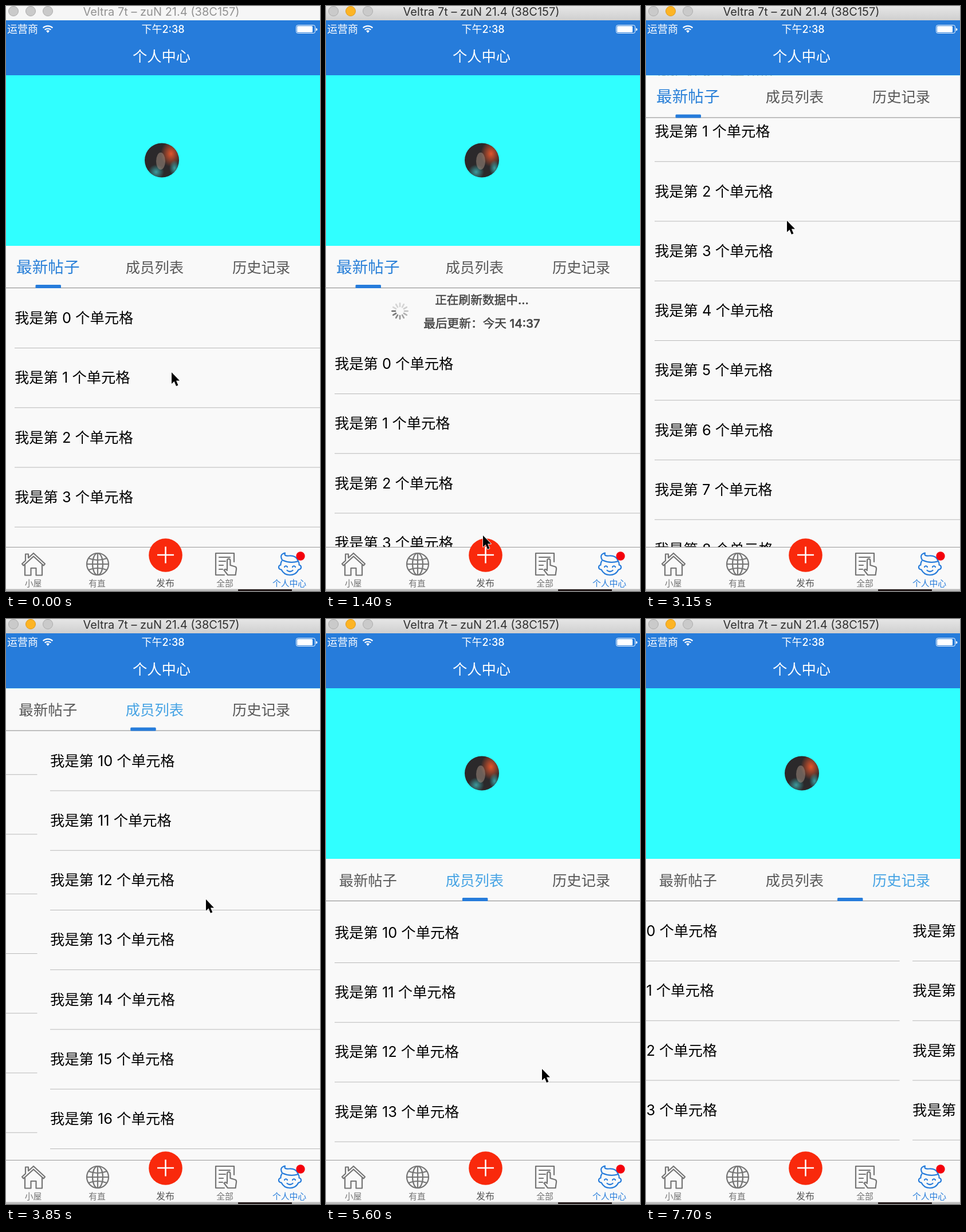
Write an HTML page that moves like this. It is 548 px wide and 1022 px high and loops after 8 s.

```html
<!DOCTYPE html>
<html lang="zh-CN">
<head>
<meta charset="utf-8">
<title>个人中心</title>
<style>
  html, body { margin: 0; width: 100%; height: 100%; overflow: hidden; background: #f9f9f9; }
  svg { display: block; width: 100vw; height: 100vh; }
  text { font-family: Inter, "Noto Sans CJK SC", "Noto Sans CJK", sans-serif; white-space: pre; }
  .mid, .hint, .label { text-anchor: middle; }
  .row { font-size: 25.3px; font-kerning: none; }
  .hint { font-size: 20.7px; font-weight: 500; fill: #444; stroke: #444; stroke-width: .5px; }
  .label { font-size: 14.8px; fill: #757575; }
  .icon { fill: none; stroke: #757575; stroke-width: 2.2; stroke-linejoin: round; stroke-linecap: round; }
  .on { stroke: #267cdb; }
</style>
</head>
<body>
<svg viewBox="0 0 548 1022" preserveAspectRatio="none">
  <defs>
    <linearGradient id="bar" x2="0" y2="1">
      <stop stop-color="#e6e6e6"/><stop offset="1" stop-color="#cfcfcf"/>
    </linearGradient>
    <radialGradient id="warm"><stop stop-color="#e0562c"/><stop offset="1" stop-color="#e0562c" stop-opacity="0"/></radialGradient>
    <radialGradient id="cool"><stop stop-color="#3c9a9c"/><stop offset="1" stop-color="#3c9a9c" stop-opacity="0"/></radialGradient>
    <clipPath id="round"><circle cx="272" cy="269.5" r="30"/></clipPath>
  </defs>
  <rect width="548" height="1022" fill="#f9f9f9"/>
  <g id="pages"></g>

  <g id="head">
    <rect y="115" width="548" height="304" fill="#30ffff"/>
    <g clip-path="url(#round)">
      <rect x="242" y="239" width="60" height="61" fill="#2b292b"/>
      <ellipse cx="288" cy="258" rx="18" ry="23" fill="url(#warm)"/>
      <ellipse cx="262" cy="290" rx="14" ry="13" fill="url(#cool)"/>
      <ellipse cx="294" cy="283" rx="9" ry="14" fill="url(#cool)"/>
      <ellipse cx="270" cy="271" rx="8" ry="15" fill="#a08d80" opacity=".55"/>
    </g>
    <rect y="419" width="548" height="74" fill="#f9f9f9"/>
    <path d="M0 492.5H548" stroke="#858585"/>
    <g id="tabs"></g>
    <rect id="mark" y="487" width="44.5" height="6" rx="1.5" fill="#267cdb"/>
  </g>

  <rect y="25" width="548" height="96" fill="#267cdb"/>
  <g fill="#fff">
    <text x="2" y="47" font-size="18">运营商</text>
    <text class="mid" x="274" y="47" font-size="18" font-weight="500">下午2:38</text>
    <text class="mid" x="271.5" y="97" font-size="25.3" font-weight="500">个人中心</text>
    <path d="M73 47l-3-3.400a4.400 4.400 0 0 1 6 0z"/>
    <g fill="none" stroke="#fff" stroke-width="2.1">
      <path d="M67.6 41.6a8 8 0 0 1 10.8 0M64.6 38.2a12.4 12.4 0 0 1 16.8 0"/>
      <rect x="506.5" y="33.5" width="33" height="14" rx="3" stroke-width="1"/>
    </g>
    <rect x="508" y="35" width="27" height="11" rx="1.5"/>
    <path d="M541 38.5a2.4 2.4 0 0 1 0 5z"/>
  </g>

  <rect id="chrome" width="548" height="25"/>
  <g id="lights"></g>
  <text id="caption" class="mid" x="271" y="16.5" font-size="20">Veltra 7t – zuN 21.4 (38C157)</text>

  <rect y="945" width="548" height="77" fill="#f9f9f9"/>
  <path d="M0 945.5H548" stroke="#999"/>
  <rect y="1018.5" width="548" height="4" fill="#bdbdbd"/>
  <rect x="405" y="1019" width="94" height="3" fill="#251c1c"/>

  <g class="icon">
    <path d="M48 956L68 974.5L65.5 977.5L48 961.5L30.5 977.5L28 974.5L34 969V957.5H39V964.2Z"/>
    <path d="M33 976V994.5H43.5V982H52.5V994.5H63V976"/>
    <circle cx="160" cy="975" r="19"/>
    <ellipse cx="160" cy="975" rx="9" ry="19"/>
    <path d="M160 956V994M141 975H179M144.5 965Q160 971 175.500 965M144.500 985Q160 979 175.500 985"/>
    <path d="M381 994H366V956H398V971M372 963H391M372 970H383M372 977H379M372 984H378"/>
    <path d="M386 984V968.5a2.7 2.7 0 0 1 5.4 0V977L400 979.5Q402.5 980.5 402 984L400.5 994H387L380.5 985.5Q383 982.5 386 986"/>
  </g>
  <g class="icon on">
    <path d="M482 968Q476.5 958 487 955.5Q484.5 961.5 494 960.5Q507 959.5 510 970Q496 974.5 482 968Z"/>
    <path d="M481 970Q479 974 479.500 976.500A3.800 3.800 0 0 0 480.500 984.500Q485 994 495.500 994T510.500 984.500A3.800 3.800 0 0 0 511.500 976.500Q512 973 510 970"/>
    <path d="M486 980q2.5-3.5 5 0M500 980q2.5-3.5 5 0M490.5 986Q495.5 990 500.5 986"/>
  </g>
  <circle cx="514" cy="961" r="7.7" fill="#f4000c"/>
  <circle cx="278.5" cy="959.5" r="29.3" fill="#f9290c"/>
  <path d="M264 959H293M278.5 944.5V973.5" stroke="#fff" stroke-width="2.6"/>
  <g class="label">
    <text x="47.5" y="1014">小屋</text>
    <text x="159" y="1014">有直</text>
    <text x="278" y="1013.5" font-size="16" fill="#555">发布</text>
    <text x="382" y="1014">全部</text>
    <text x="494.5" y="1014" fill="#267cdb">个人中心</text>
  </g>

  <path id="cursor" d="M0 0V20L4.6 15.8L8 24L11.4 22.5L8 14.6H14Z" stroke="#fff" stroke-width="1.6" stroke-linejoin="round" paint-order="stroke"/>
</svg>
<script>
const LOOP = 8000, STEP = 350;
const PAGE_W = 558, EDGE = -7.5, ROW_H = 104.25, TAB_GAP = 186.4;
const FOLD = 297.5, HOLD = 80;
const $ = id => document.getElementById(id);

function set(el, attrs) {
  for (const k in attrs) el.setAttribute(k, attrs[k]);
  return el;
}
function add(parent, tag, attrs, text = '') {
  const el = set(document.createElementNS('http://www.w3.org/2000/svg', tag), attrs);
  el.textContent = text;
  return parent.appendChild(el);
}
const move = (el, x, y) => set(el, { transform: `translate(${x} ${y})` });

// Progress of step s from a to b
const ramp = (s, a, b) => Math.min(1, Math.max(0, (s - a) / (b - a)));
const smooth = (s, a, b) => { const x = ramp(s, a, b); return x * x * (3 - 2 * x); };
const easeOut = (s, a, b) => 1 - (1 - ramp(s, a, b)) ** 2;

// Pull past the refresh height, hold there from `busy`, spring back around `done`
function pull(s, { busy, done }) {
  const g = ramp(s, busy - 2, busy);
  return (HOLD * g + 70 * Math.sin(Math.PI * g)) * (1 - ramp(s, done - .26, done + .74));
}

const fold = s => FOLD * (smooth(s, 7, 9) - smooth(s, 14, 16));
const swipe = s => easeOut(s, 9, 12);
const page = s => swipe(s) + smooth(s, 21, 24.55);
const tab = s => swipe(s) + ramp(s, 21, 22.94);

const lists = [
  { busy: 4, done: 7, last: '14:37', scroll: s => -430 * smooth(s, 7, 9) },
  { busy: 17.98, done: 21, last: '14:38', scroll: s => FOLD * (smooth(s, 13.43, 16) - 1) },
  { busy: 99, done: 99, last: '14:38', scroll: () => 0 }
];

// Resting points of the pointer: step, x, y
const stops = [
  [2, 289, 640], [4, 274, 925], [7, 249, 786], [9, 246, 375], [12, 385, 530],
  [14, 282, 566], [16, 377, 786], [18, 374, 920], [21, 440, 465]
];
function pointer(s) {
  const i = Math.max(1, stops.findIndex(p => p[0] >= s));
  const [a, ax, ay] = stops[i - 1], [b, bx, by] = stops[i];
  const k = smooth(s, a, b);
  return [ax + (bx - ax) * k, ay + (by - ay) * k];
}

lists.forEach((list, n) => {
  const g = list.g = add($('pages'), 'g', {});
  const mid = 272 - EDGE;
  list.state = add(g, 'text', { class: 'hint', x: mid, y: 440.5 });
  list.time = add(g, 'text', { class: 'hint', x: mid, y: 481.5 });
  list.spin = move(add(g, 'g', {}), 129 - EDGE, 453);
  for (let i = 0; i < 12; i++)
    add(list.spin, 'path', { d: 'M0 -8V-13.6', stroke: '#6c6c6c', 'stroke-width': 2.7, 'stroke-linecap': 'round', transform: `rotate(${i * 30})` });
  for (let i = 0; i < 10; i++) {
    const y = 554 + i * ROW_H;
    add(g, 'text', { class: 'row', x: 22.5, y }, `我是第 ${n * 10 + i} 个单元格`);
    add(g, 'path', { d: `M22.5 ${y + 43.5}H${PAGE_W}`, stroke: '#b9b9b9' });
  }
});
const tabs = ['最新帖子', '成员列表', '历史记录'].map((name, i) =>
  add($('tabs'), 'text', { class: 'mid', x: 73.3 + i * 186.1, y: 465.5 }, name));
const lights = [0, 1, 2].map(i => add($('lights'), 'circle', { cx: 13 + 30 * i, cy: 9, r: 8.5 }));

function drawList(list, n, s) {
  const y = list.scroll(s) + pull(s, list);
  const busy = s >= list.busy && s < list.done;
  move(list.g, EDGE + (n - page(s)) * PAGE_W, y);
  list.state.textContent = busy ? '正在刷新数据中...' : y > HOLD ? '松开立即刷新' : '下拉可以刷新';
  list.time.textContent = `最后更新：今天 ${s < list.done ? list.last : '14:38'}`;
  set(list.spin, { opacity: busy ? 1 : s === list.done ? .55 : 0 });
  const lead = Math.floor(s * STEP / 1000 * 12) + 5;
  [...list.spin.children].forEach((spoke, i) =>
    set(spoke, { opacity: Math.max(.25, 1 - (lead - i + 12) % 12 * .1) }));
}

function draw(s) {
  lists.forEach((list, n) => drawList(list, n, s));
  move($('head'), 0, -fold(s));

  const at = tab(s), chosen = Math.round(at);
  tabs.forEach((el, i) => set(el, {
    fill: i !== chosen ? '#585858' : i ? '#46a3e4' : '#2a80d8',
    'font-size': i ? 25.3 : 25.3 + 2.3 * Math.max(0, 1 - at)
  }));
  set($('mark'), { x: 51.5 + at * TAB_GAP });

  const active = s > 0;
  set($('chrome'), { fill: active ? 'url(#bar)' : '#f6f6f6' });
  set($('caption'), { fill: active ? '#303030' : '#929292' });
  lights.forEach((el, i) => {
    const lit = active && i === 1;
    set(el, { fill: lit ? '#fdb424' : '#cacaca', stroke: lit ? '#dc9a22' : '#adadad' });
  });

  const shown = s <= 21;
  set($('cursor'), { visibility: shown ? 'visible' : 'hidden' });
  if (shown) move($('cursor'), ...pointer(s));
}

// The picture only refreshes every STEP ms
function frame() {
  draw(Math.floor(performance.now() % LOOP / STEP));
  requestAnimationFrame(frame);
}
frame();
</script>
</body>
</html>
```
